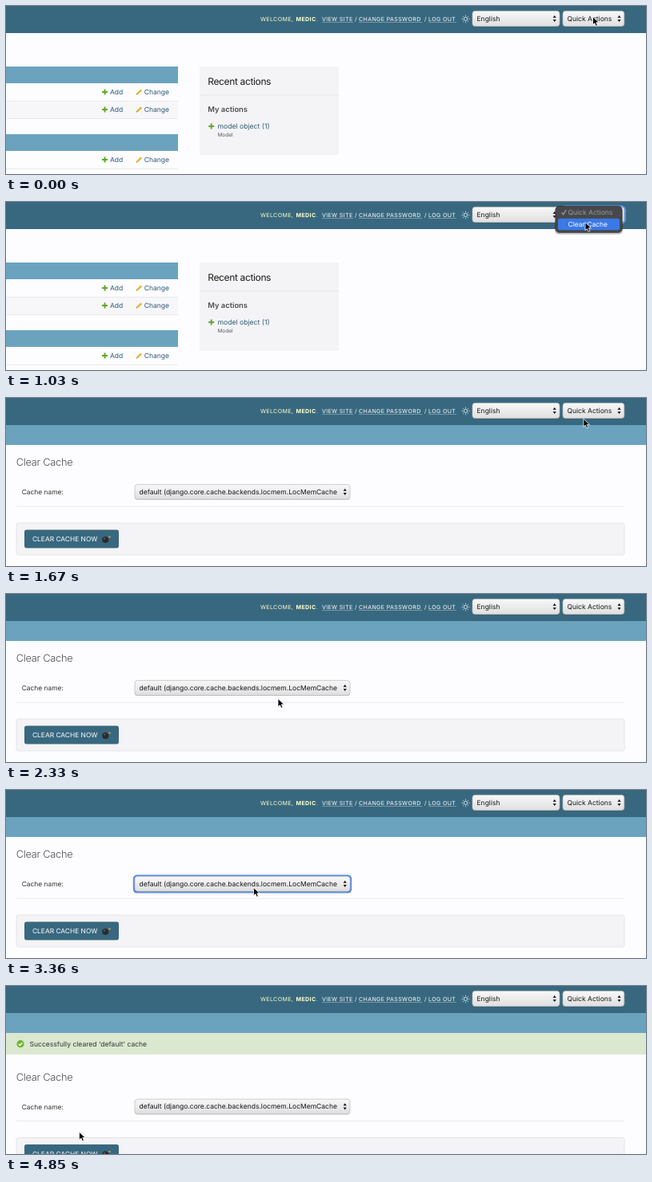
An HTML page for the animation above (4880 ms loop, 800 by 211 pixels).

```html
<!DOCTYPE html>
<html lang="en">
<head>
<meta charset="utf-8">
<title>Clear cache quick action</title>
<style>
  html, body { margin: 0; width: 100%; height: 100%; overflow: hidden; background: #fdfcfe; }
  svg { display: block; width: 800px; height: 211px; }
  text { font-family: Inter, Roboto, sans-serif; text-rendering: geometricPrecision; white-space: pre; }
</style>
</head>
<body>
<svg id="stage" viewBox="0 0 800 211" xmlns="http://www.w3.org/2000/svg"></svg>
<script>
const LOOP = 4880;
const HEADER = '#38687f', BAR = '#6ba3be', LINK = '#2d5d75', PANEL = '#f4f3f5', RULE = '#e6e5e8';
const CACHE = 'default (django.core.cache.backends.locmem.LocMemCache';

const rect = (x, y, w, h, fill, extra = '') =>
  `<rect x="${x}" y="${y}" width="${w}" height="${h}" fill="${fill}" ${extra}/>`;
const text = (x, y, size, fill, content, extra = '') =>
  `<text x="${x}" y="${y}" font-size="${size}" fill="${fill}" ${extra}>${content}</text>`;
const path = (d, extra) => `<path d="${d}" ${extra}/>`;
const group = (id, content) => `<g id="${id}">${content}</g>`;

function select(x, y, w, h, label, dark = false) {
  const ink = dark ? '#f2f2f2' : '#161616';
  const ax = x + w - 6.3, cy = y + h / 2;
  return rect(x, y + 0.8, w, h, '#000', 'rx="3.5" opacity=".2"') +
    rect(x, y, w, h, `url(#${dark ? 'darkSelect' : 'lightSelect'})`,
      `rx="3.5" stroke="${dark ? '#565656' : '#b9b9bb'}" stroke-width=".7"`) +
    text(x + 5.5, cy + 3, 8.52, ink, label) +
    path(`M${ax - 2.1} ${cy - 1.2}l2.1-2.9 2.1 2.9zm0 2.4l2.1 2.9 2.1-2.9z`, `fill="${ink}"`);
}

function userTools(shift) {
  const style = 'letter-spacing=".35"';
  const link = (x, w, label) => text(x + shift, 18.7, 7.1, '#fff', label, style) +
    rect(x + shift, 20, w, 0.7, '#fff', 'opacity=".45"');
  const slash = x => text(x + shift, 18.7, 7.1, '#ffc', '/', style);
  return text(318 + shift, 18.7, 7.1, '#ffc', 'WELCOME,', style) +
    text(362.5 + shift, 18.7, 7.1, '#ffc', '<tspan font-weight="700">MEDIC</tspan>.', style) +
    link(395, 39, 'VIEW SITE') + slash(436) +
    link(441, 79.5, 'CHANGE PASSWORD') + slash(523) + link(528, 35, 'LOG OUT');
}

function sun() {
  const rays = Array.from({ length: 8 }, (_, i) =>
    `<path d="M0-3.6V-4.9" transform="rotate(${i * 45})"/>`).join('');
  return `<g transform="translate(574.5 16.3)" fill="none" stroke="#fff" stroke-width=".8">
    <circle r="2.2"/>${rays}</g>`;
}

const header = dark => rect(0, 0, 800, 34, HEADER) + userTools(dark ? 11 : 0) + (dark ? '' : sun()) +
  select(583, 6.3, 109, 19.2, 'English', dark) + select(696, 6.3, 76.8, 19.2, 'Quick Actions', dark);

const plus = (x, y) => path(`M${x - 3.5} ${y}h7M${x} ${y - 3.5}v7`, 'stroke="#63a82b" stroke-width="2"');
const pencil = (x, y) => path(`M${x} ${y}l1-2.6 4.6-4.5 1.8 1.8-4.7 4.5z`, 'fill="#e8b636"') +
  path(`M${x} ${y}l.6-1.5 1 1z`, 'fill="#886a25"');

const modelRow = y => plus(123.5, y) + text(130, y + 3, 8.5, LINK, 'Add') +
  pencil(162.7, y + 3.5) + text(172.7, y + 3, 8.5, LINK, 'Change') + rect(0, y + 11, 215, 0.8, RULE);

const dashboard =
  rect(0, 76, 215, 21, BAR) + rect(0, 119, 215, 22, '#f7f6f8') + modelRow(108) + modelRow(130) +
  rect(0, 161, 215, 21, BAR) + modelRow(193) +
  rect(242, 76, 174, 111, PANEL) + rect(242, 111.6, 174, 0.8, '#e2e1e5') +
  text(252.3, 98.5, 12, '#1a1a1a', 'Recent actions', 'letter-spacing="-.36"') +
  text(252.3, 132.6, 9.35, '#4c4c4e', 'My actions', 'font-weight="600"') +
  plus(256.7, 151) + text(264.5, 154, 8.65, LINK, 'model object (1)') +
  text(264.5, 164, 6.5, '#59595b', 'Model');

const bomb = `<g transform="translate(124.3 178)"><circle r="4.1" fill="#2b2b2c"/>
  <circle cx="-1.3" cy="-1.5" r="1" fill="#68686a"/>
  <path d="M2.4-2.6Q4-5.3 5.2-3.4" fill="none" stroke="#8c7652"/>
  <circle cx="5.4" cy="-3.4" r="1.1" fill="#e9a13a"/></g>`;

const form =
  text(12.7, 85, 12.8, '#4f4f51', 'Clear Cache', 'font-weight="300" letter-spacing="-.25"') +
  text(19.7, 121, 8.4, '#333', 'Cache name:') +
  rect(158.8, 106.6, 273.4, 23, '#5b8ce4', 'id="cacheRing" rx="5"') +
  select(161, 108.6, 269, 18.6, CACHE) +
  rect(13, 135.8, 760, 0.8, RULE) +
  rect(13, 157, 760, 40, PANEL, 'rx="2.5" stroke="#e0dfe3" stroke-width=".8"') +
  rect(23, 165.5, 118, 23, HEADER, 'id="button" rx="2.7"') +
  text(33, 180.1, 8.4, '#fff', 'CLEAR CACHE NOW') + bomb;

const darkPage = rect(0, 0, 800, 211, '#111112') + rect(0, 34, 800, 25, '#224252') +
  select(-25, 108.6, 269, 18.6, CACHE, true) +
  rect(0, 136, 773, 0.8, '#262627') + rect(-5, 156.5, 778, 41, '#1d1d1e', 'rx="2.5" stroke="#272728" stroke-width=".7"') +
  header(true);

const message = rect(0, 59, 800, 27, '#dbe8d0') +
  '<circle cx="18" cy="72.7" r="4.6" fill="#6fb52f"/>' +
  path('M15.8 72.7l1.7 1.8 2.9-3.3', 'fill="none" stroke="#fff" stroke-width="1.3"') +
  text(29.5, 75.7, 8.56, '#2f3231', "Successfully cleared 'default' cache");

const check = (x, y, color) =>
  path(`M${x} ${y}l2 2.5 3.6-5.6`, `fill="none" stroke="${color}" stroke-width="1.2"`);
const popup = (x, y, w, h) =>
  rect(x - 1, y + 0.5, w + 2, h + 2, '#000', 'rx="5" opacity=".22"') +
  rect(x, y, w, h, '#47484b', 'rx="4.5" stroke="#333437" stroke-width=".8"');

const actionMenu =
  popup(687, 5.3, 83, 33) + check(694.5, 13.2, '#a2a2a4') +
  text(702.5, 16.3, 8.52, '#9b9b9e', 'Quick Actions') +
  rect(690, 20.8, 77, 14.4, '#3a79e6', 'id="actionHot" rx="2.5"') +
  text(702.5, 31, 8.52, '#fff', 'Clear Cache');

const cacheMenu = popup(151.8, 103.8, 275.4, 21.8) + rect(155, 107.2, 269, 15, '#3a79e6', 'rx="2.5"') +
  check(159.3, 114.8, '#fff') + text(168, 117.9, 8.52, '#fff', CACHE);

const arrow = path('M0 0v10.2l2.4-2.2 1.6 3.7 1.9-.8-1.6-3.6h3.2z',
  'fill="#000" stroke="#fff" stroke-width=".8" stroke-linejoin="round"');
const hand = path('M-.9 1.2Q0-.2.9 1.2V4.6Q2-.1 2.8 5 4-.1 4.5 5.5 6 4.6 6 6.5V9L4.7 12.2H-.8L-3.8 7.6Q-3.4 5.8-1.6 7.6L-.9 8.2z',
  'fill="#fff" stroke="#111" stroke-width=".8" stroke-linejoin="round"');

const gradient = (id, ...colors) => `<linearGradient id="${id}" x2="0" y2="1">` +
  colors.map((c, i) => `<stop offset="${i / (colors.length - 1)}" stop-color="${c}"/>`).join('') + '</linearGradient>';

const stage = document.getElementById('stage');
stage.innerHTML =
  `<defs>${gradient('lightSelect', '#f8f8f8', '#ececec', '#dedede')}${gradient('darkSelect', '#4a4a4b', '#252526', '#0c0c0d')}</defs>` +
  rect(0, 0, 800, 211, '#fdfcfe') +
  group('dashboard', dashboard) +
  group('formPage', group('form', form) + rect(0, 34, 800, 25, BAR) + group('message', message)) +
  group('lightHeader', rect(693.8, 4.2, 81.2, 23.4, '#5b8ce4', 'rx="5"') + header(false)) +
  rect(695, 5.3, 78.8, 21.2, 'none', 'id="actionRing" rx="4.5" stroke="#6c98e4" stroke-width="2"') +
  group('darkPage', darkPage) +
  group('actionMenu', actionMenu) + group('cacheMenu', cacheMenu) +
  group('cursor', group('arrow', arrow) + group('hand', hand));

const ui = Object.fromEntries([...stage.querySelectorAll('[id]')].map(el => [el.id, el]));
const show = (id, on) => ui[id].setAttribute('display', on ? 'inline' : 'none');

// [time, x, y] of the pointer tip
const route = [
  [0, 733.5, 13.5], [350, 733.5, 13.5], [800, 724, 25.5], [1650, 724, 25.5],
  [2130, 340, 131.5], [2400, 340, 131.5], [2700, 331, 116.5],
  [3250, 331, 116.5], [3850, 91.5, 183.2], [LOOP, 91.5, 183.2]
];
const ease = u => u * u * (3 - 2 * u);

function pointer(t) {
  const i = route.findIndex(stop => stop[0] > t);
  const [t0, x0, y0] = route[i - 1], [t1, x1, y1] = route[i];
  const u = ease((t - t0) / (t1 - t0));
  return [x0 + (x1 - x0) * u, y0 + (y1 - y0) * u];
}

function render(t) {
  const within = (from, to) => t >= from && t < to;
  const [x, y] = pointer(t);
  const done = t >= 4540;
  const hover = !done && x > 23 && x < 141 && y > 165 && y < 189;

  show('dashboard', t < 1330);
  show('darkPage', within(1330, 1480));
  show('formPage', t >= 1480);
  show('actionMenu', within(200, 1120));
  show('actionRing', within(200, 1330));
  show('actionHot', y > 20);
  show('cacheMenu', within(2760, 3180));
  show('cacheRing', within(2760, 4540));
  show('message', done);
  show('arrow', !hover);
  show('hand', hover);
  ui.form.setAttribute('transform', `translate(0 ${done ? 33.5 : 0})`);
  ui.button.setAttribute('fill', hover ? '#1f4a5e' : HEADER);
  ui.cursor.setAttribute('transform', `translate(${x} ${y})`);
}

// The first frame doubles as the header's resting state
ui.lightHeader.firstElementChild.remove();

const start = performance.now();
function tick() {
  render((performance.now() - start) % LOOP);
  requestAnimationFrame(tick);
}
render(0);
requestAnimationFrame(tick);
</script>
</body>
</html>
```
